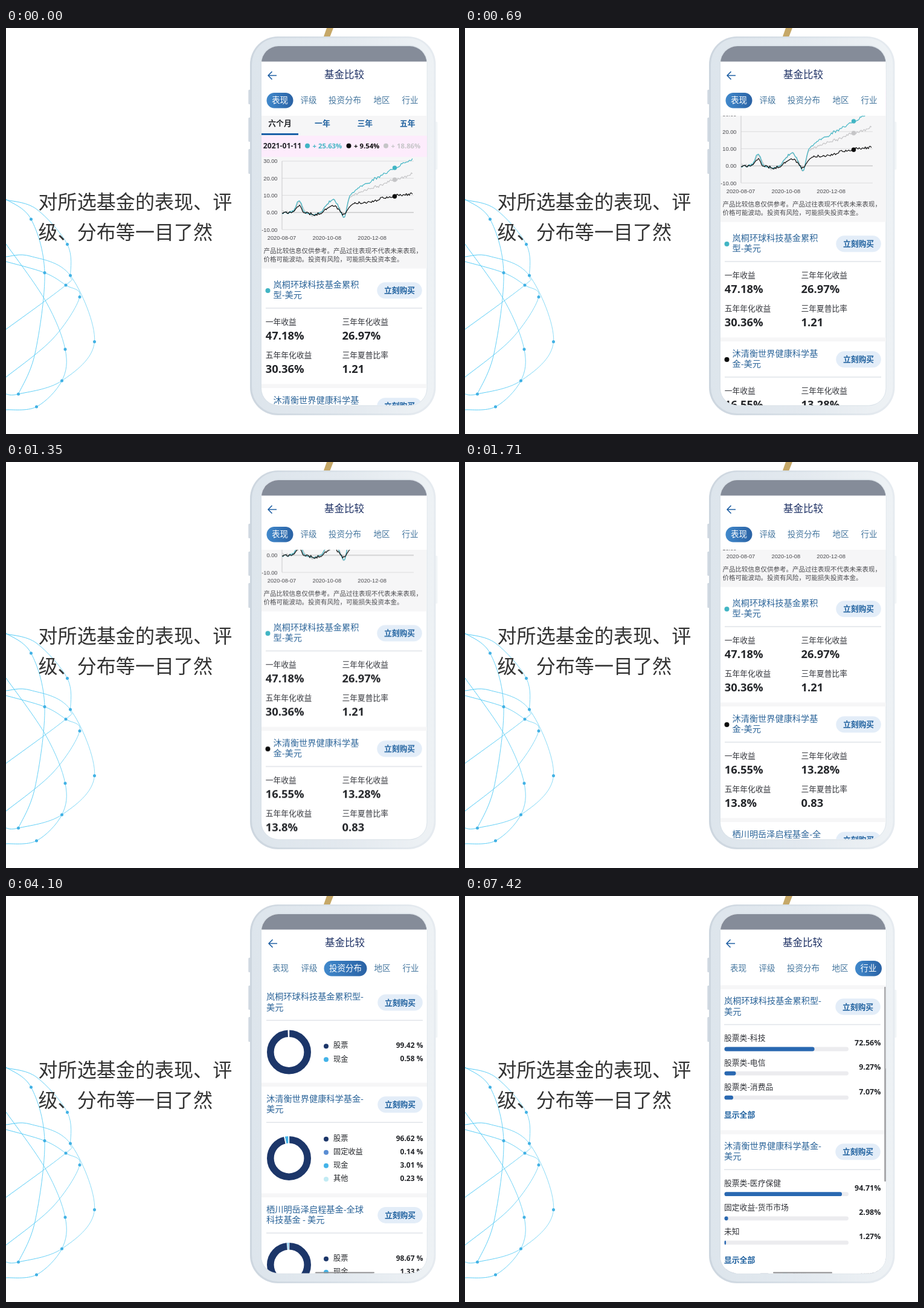
Recreate the animation shown at these times as an HTML page. Size 750 by 671 pixels, loop 9.02 s.

```html
<!DOCTYPE html>
<html lang="zh-CN">
<head>
<meta charset="utf-8">
<title>基金比较</title>
<style>
html, body { margin: 0; width: 100%; height: 100%; overflow: hidden; background: #fff; }
svg { display: block; width: 750px; height: 671px; }
text { font-family: "Noto Sans CJK SC", "Noto Sans CJK", sans-serif; white-space: pre; }
.mid { text-anchor: middle; }
.end { text-anchor: end; }
.medium { font-weight: 500; }
.bold { font-weight: 600; }
.num { font-family: "Noto Sans", "Open Sans", sans-serif; font-weight: 700; }
.num.semi { font-weight: 600; }
.num.plain { font-weight: 500; }
.axis { font-family: "Liberation Sans", Arial, sans-serif; }
.scroll { animation: scroll 9020ms infinite; }
.rating { animation: rating 9020ms step-end infinite; }
.assets { animation: assets 9020ms step-end infinite; }
.region { animation: region 9020ms step-end infinite; }
.sector { animation: sector 9020ms step-end infinite; }
@keyframes scroll {
  0% { transform: translateY(0); animation-timing-function: steps(71, end); }
  23.614%, to { transform: translateY(-237.9px); }
}
@keyframes rating { 0% { opacity: 0; } 26.829%, to { opacity: 1; } }
@keyframes assets { 0% { opacity: 0; } 45.454%, to { opacity: 1; } }
@keyframes region { 0% { opacity: 0; } 63.858%, to { opacity: 1; } }
@keyframes sector { 0% { opacity: 0; } 82.261%, to { opacity: 1; } }
</style>
</head>
<body>
<svg id="stage" viewBox="0 0 750 671"></svg>
<script>
const BLUE = '#2b6499', LINK = '#1f619f', INK = '#303238', DARK = '#222428', PANEL = '#f6f6f7';
const TEAL = '#41b5c4', SILVER = '#c5c5c7', BLACK = '#0c0c0c', NAVY = '#1c3669';

const FUNDS = [
  ['岚桐环球科技基金累积型-', '美元'],
  ['沐清衡世界健康科学基金-', '美元'],
  ['栖川明岳泽启程基金-全球', '科技基金 - 美元']
];

// y is the vertical centre of the glyphs
const text = (x, y, str, size, fill, cls = '') =>
  `<text x="${x}" y="${y + size * 0.37}" font-size="${size}" fill="${fill}" class="${cls}">${str}</text>`;
const rect = (x, y, w, h, fill, r = 0) =>
  `<rect x="${x}" y="${y}" width="${w}" height="${h}" rx="${r}" fill="${fill}"/>`;
const dot = (x, y, r, fill) => `<circle cx="${x}" cy="${y}" r="${r}" fill="${fill}"/>`;
const line = (d, stroke, width = 1) =>
  `<path d="${d}" fill="none" stroke="${stroke}" stroke-width="${width}" stroke-linejoin="round"/>`;
const group = (dx, dy, body, cls = '') =>
  `<g class="${cls}"><g transform="translate(${dx} ${dy})">${body}</g></g>`;
const each = (list, fn) => list.map(fn).join('');
const range = n => Array.from({ length: n }, (_, i) => i);

// Catmull-Rom curve through points
function curve(pts) {
  const at = i => pts[Math.max(0, Math.min(pts.length - 1, i))];
  return `M${pts[0]}` + each(pts.slice(1), (c, i) => {
    const a = at(i - 1), b = at(i), e = at(i + 2);
    const handle = (p, from, to) => p.map((v, k) => v + (to[k] - from[k]) / 6);
    return `C${handle(b, a, c)} ${handle(c, e, b)} ${c}`;
  });
}

function globe() {
  const nodes = [[41.5, 316], [101.5, 357.5], [64, 404.5], [106.5, 409], [99, 425], [122, 444.5],
    [146.5, 518.5], [98, 531], [92.5, 583], [20.5, 605], [50.5, 626]];
  const [a, b, c, d, e, f, g, h, i, j, k] = nodes;
  const edge = y => [0, y];
  const orbits = [
    [edge(284), [50, 299], b, d, e, edge(498)],
    [edge(283), a, c, [48, 538], j],
    [edge(378), [40, 377], d, g, i, j, edge(605)],
    [edge(386), c, e, f, [78, 513], edge(577)],
    [edge(357), [66, 452], h, i, k, edge(631)]
  ];
  return each(orbits, o => line(curve(o), 'url(#arc)')) + each(nodes, n => dot(...n, 2.5, '#42b1e4'));
}

function header(active) {
  const tabs = [['表现', 453.5], ['评级', 501], ['投资分布', 561], ['地区', 622], ['行业', 669]];
  return rect(415, 55, 290, 90, '#fff')
    + line('M448 78.5H434M440.5 72L434 78.5L440.5 85', '#1f5fa3', 1.7)
    + text(560, 77, '基金比较', 16.5, '#1c2f63', 'mid medium')
    + each(tabs, ([name, x], i) => {
      const on = i === active, w = name.length * 13.5 + 17;
      return (on ? rect(x - w / 2, 107, w, 25.5, 'url(#pill)', 12.7) : '')
        + text(x, 119, name, 13.5, on ? '#fff' : '#46779f', 'mid' + (on ? ' medium' : ''));
    });
}

const button = y => rect(614.3, y - 13.5, 74.5, 27, '#e3edf8', 13.5)
  + text(651.5, y, '立刻购买', 12.8, LINK, 'mid bold');
const divider = y => rect(430, y - 0.75, 259, 1.5, '#e0e4e9');
const gap = y => rect(415, y, 290, 6.5, PANEL);
const fundHead = (i, y) => text(430, y - 39.5, FUNDS[i][0], 14.2, BLUE)
  + text(430, y - 22, FUNDS[i][1], 14.2, BLUE) + button(y - 29.5) + divider(y);

// Chart height: shared autumn swings, then a jump and a steady rise
const bell = (x, mid, width) => Math.exp(-(((x - mid) / width) ** 2));
const trend = (x, { swing, jump, rise }) => {
  const s = Math.max(0, (x - 566) / 109);
  return 304 - swing * (bell(x, 485, 6) + 1.15 * bell(x, 540, 12) - 0.7 * bell(x, 559, 4.5))
    + 5 * bell(x, 510, 9) - jump / (1 + Math.exp((565 - x) / 1.5)) - rise * s ** 0.85;
};
const noise = n => { const v = Math.sin(n * 12.9898) * 43758.5453; return v - Math.floor(v) - 0.5; };
const series = (s, seed) => line('M' + range(128).map(i => {
  const x = 457 + i * 1.7;
  return `${x.toFixed(1)},${(trend(x, s) + 4 * noise(i + seed) + 3 * noise((i >> 2) + seed)).toFixed(1)}`;
}).join('L'), s.color, 1.2);

function chart() {
  const lines = [
    { color: SILVER, swing: 17, jump: 21, rise: 43 },
    { color: TEAL, swing: 18, jump: 25, rise: 64 },
    { color: BLACK, swing: 9, jump: 10, rise: 21 }
  ];
  return rect(415, 213, 290, 184.5, PANEL)
    + each(range(5), i => {
      const y = 220 + i * 28.3;
      return line(`M457 ${y}H675`, i === 3 ? '#b4b4b6' : '#dcdcde')
        + text(449.5, y, (30 - i * 10).toFixed(2), 9.3, '#48484c', 'axis end');
    })
    + line('M457 220V333', '#c9c9cc')
    + each(lines, (s, i) => series(s, i * 200 + 7))
    + each(lines, s => dot(643.5, trend(643.5, s), 3.7, s.color))
    + each(['08', '10', '12'], (m, i) =>
      text(456.5 + i * 74.8, 346.3, `2020-${m}-${i ? '08' : '07'}`, 9.3, '#48484c', 'axis mid'))
    + text(426.5, 368.5, '产品比较信息仅供参考。产品过往表现不代表未来表现，', 10.5, '#48484c')
    + text(426.5, 382.3, '价格可能波动。投资有风险，可能损失投资本金。', 10.5, '#48484c');
}

function performanceCard(i, color, values) {
  const labels = ['一年收益', '三年年化收益', '五年年化收益', '三年夏普比率'];
  const name = FUNDS[i].join(''), cut = name.slice(0, 10).includes('-') ? 11 : 10;
  return group(0, i * 191,
    dot(433.5, 434, 4, color)
    + text(442.5, 424, name.slice(0, cut), 14.2, BLUE) + text(442.5, 441, name.slice(cut), 14.2, BLUE)
    + button(433.7) + divider(463)
    + each(values, (v, k) => {
      const x = k % 2 ? 556.5 : 429.7, y = 485 + (k >> 1) * 55.5;
      return text(x, y, labels[k], 12.75, INK) + text(x, y + 23, v, 18.4, DARK, 'num');
    })
    + gap(588.5));
}

function performanceScreen() {
  const periods = rect(415, 145, 290, 33, PANEL) + rect(423, 174, 61, 3, '#1c61a8')
    + each(['六个月', '一年', '三年', '五年'], (p, i) =>
      text(453.5 + i * 70.4, 157, p, 12.8, i ? LINK : DARK, 'mid bold'));
  const legend = rect(415, 178, 290, 35, '#fdecfc')
    + text(425.7, 194.7, '2021-01-11', 12.2, DARK, 'num')
    + each([[499, TEAL, '+ 25.63%'], [567.5, BLACK, '+ 9.54%'], [629, SILVER, '+ 18.86%']],
      ([x, color, v]) => dot(x, 194.7, 4, color) + text(x + 8.6, 194.7, v, 11.3, color, 'num'));
  const cards = performanceCard(0, TEAL, ['47.18%', '26.97%', '30.36%', '1.21'])
    + performanceCard(1, BLACK, ['16.55%', '13.28%', '13.8%', '0.83'])
    + performanceCard(2, SILVER, []);
  return rect(415, 30, 290, 600, '#fff') + group(0, 0, periods + legend + chart() + cards, 'scroll') + header(0);
}

const screen = (cls, active, dx, body) => group(dx, 0,
  rect(415, 30, 290, 600, '#fff') + body + header(active) + rect(511, 621.6, 98, 2, '#8b8b8e', 1), cls);

function star(cx, cy) {
  const pts = range(10).map(i => {
    const r = i % 2 ? 3 : 7.2, a = (i * 36 - 90) * Math.PI / 180;
    return `${(cx + r * Math.cos(a)).toFixed(2)},${(cy + r * Math.sin(a)).toFixed(2)}`;
  });
  return `<path d="M${pts.join('L')}Z" fill="#26282e"/>`;
}

const ratingScreen = () => screen('rating', 1, -1,
  rect(415, 549, 290, 80, PANEL) + each([4, 5, 4], (count, i) => group(0, i * 133.7,
    gap(147.5) + fundHead(i, 212.5)
    + text(430, 238.5, '曦衡评级', 12.3, INK) + text(478.8, 233.3, 'TM', 9.6, INK, 'num plain')
    + each(range(count), k => star(437 + k * 14.8, 258.5)))));

function donut(cy, shares, colors) {
  let sum = 0, arcs = '', cuts = '';
  shares.forEach((share, i) => {
    const turn = `rotate(${sum * 3.6} 467.5 ${cy})`;
    arcs += `<path d="M467.5 ${cy - 30.7}a30.7 30.7 0 0 1 0 61.4a30.7 30.7 0 0 1 0 -61.4" fill="none" stroke="${colors[i]}" `
      + `stroke-width="11.6" pathLength="100" stroke-dasharray="${share} 100" transform="${turn}"/>`;
    cuts += `<path d="M467.5 ${cy - 24}v-14" stroke="#fff" stroke-width="1.4" transform="${turn}"/>`;
    sum += share;
  });
  return arcs + cuts;
}

function assetsScreen() {
  const tones = { 股票: NAVY, 固定收益: '#5a8dd3', 现金: '#43b3e8', 其他: '#c2ebf4' };
  const mixes = [
    { 股票: 99.42, 现金: 0.58 },
    { 股票: 96.62, 固定收益: 0.14, 现金: 3.01, 其他: 0.23 },
    { 股票: 98.67, 现金: 1.33 }
  ];
  let y = 205.5;
  return screen('assets', 2, 1, each(mixes, (mix, i) => {
    const names = Object.keys(mix), rows = names.length, cy = y + 45.7 + rows * 3.4;
    const card = fundHead(i, y) + donut(cy, Object.values(mix), names.map(n => tones[n]))
      + each(names, (n, k) => {
        const row = cy + (k - (rows - 1) / 2) * 22.1;
        return dot(529, row + 1.3, 4, tones[n]) + text(541, row, n, 12.2, DARK, 'medium')
          + text(689.5, row, mix[n].toFixed(2) + ' %', 12, DARK, 'num semi end');
      });
    y += 154.6 + rows * 7.05;
    return card + gap(y - 65.6);
  }));
}

const barScreen = (cls, active, lists, extra = '') => screen(cls, active, -1,
  each(lists, (rows, i) => group(0, i * 239.7,
    gap(147.5) + fundHead(i, 212.5)
    + each(Object.entries(rows), ([name, value], k) => {
      const y = 253 + k * 40.1;
      return text(430, y - 18.3, name, 12.8, INK) + rect(430.5, y - 3.4, 205.5, 6.8, '#ececef', 3.4)
        + rect(430.5, y - 3.4, 205.5 * value / 100, 6.8, '#2968b1', 3.4)
        + text(689.5, y - 10.3, value.toFixed(2) + '%', 12.5, DARK, 'num semi end');
    })
    + text(430, 361.7, '显示全部', 12.8, LINK, 'bold'))) + extra);

const regionScreen = () => barScreen('region', 3, [
  { '美国': 62.35, '亚洲-新兴市场': 11.48, '日本': 6.72 },
  { '美国': 74.16, '欧元区': 8.93, '瑞士': 6.05 }
]);
const sectorScreen = () => barScreen('sector', 4, [
  { '股票类-科技': 72.56, '股票类-电信': 9.27, '股票类-消费品': 7.07 },
  { '股票类-医疗保健': 94.71, '固定收益-货币市场': 2.98, '未知': 1.27 }
], rect(695.3, 150, 2.5, 322, '#9b9b9e', 1.2));

const phone = () =>
  each([[102, 24], [148, 40], [200, 41]], ([y, h]) => rect(401.3, y, 5, h, '#d0d9e1', 1.5))
  + rect(709, 155, 5.5, 79, '#f2f5f7', 1.5)
  + rect(404, 14, 307.5, 626, 'url(#rim)', 46)
  + rect(407, 16.5, 301.5, 620.5, 'url(#body)', 43.5)
  + rect(421.5, 28.5, 276, 596, '#d9e1e8', 29.5);

const gradient = (id, stops, attrs = '') => `<linearGradient id="${id}" ${attrs}>`
  + each(stops, (c, i) => `<stop offset="${i / (stops.length - 1)}" stop-color="${c}"/>`) + '</linearGradient>';

document.getElementById('stage').innerHTML = `
  <defs>
    ${gradient('arc', ['#4cc9f6', '#90dcf6'], 'gradientUnits="userSpaceOnUse" x1="0" x2="150"')}
    ${gradient('pill', ['#4189cc', '#2a62a4'])}
    ${gradient('rim', ['#cdd6df', '#d9e1e8', '#e6ebf0'])}
    ${gradient('body', ['#dde5ec', '#e3e9ef', '#eef2f5'])}
    <clipPath id="glass"><rect x="423" y="30" width="273.5" height="593.5" rx="28"/></clipPath>
  </defs>
  <path d="M531 0H542L536.5 14H526Z" fill="#c6a868"/>
  ${globe()}
  ${each(['对所选基金的表现、评', '级、分布等一目了然'], (s, i) => text(53.5, 286.8 + i * 50, s, 32.1, '#333'))}
  ${phone()}
  <g clip-path="url(#glass)">
    ${performanceScreen()}${ratingScreen()}${assetsScreen()}${regionScreen()}${sectorScreen()}
    ${rect(415, 30, 290, 25.5, '#858c99')}
  </g>`;
</script>
</body>
</html>
```
